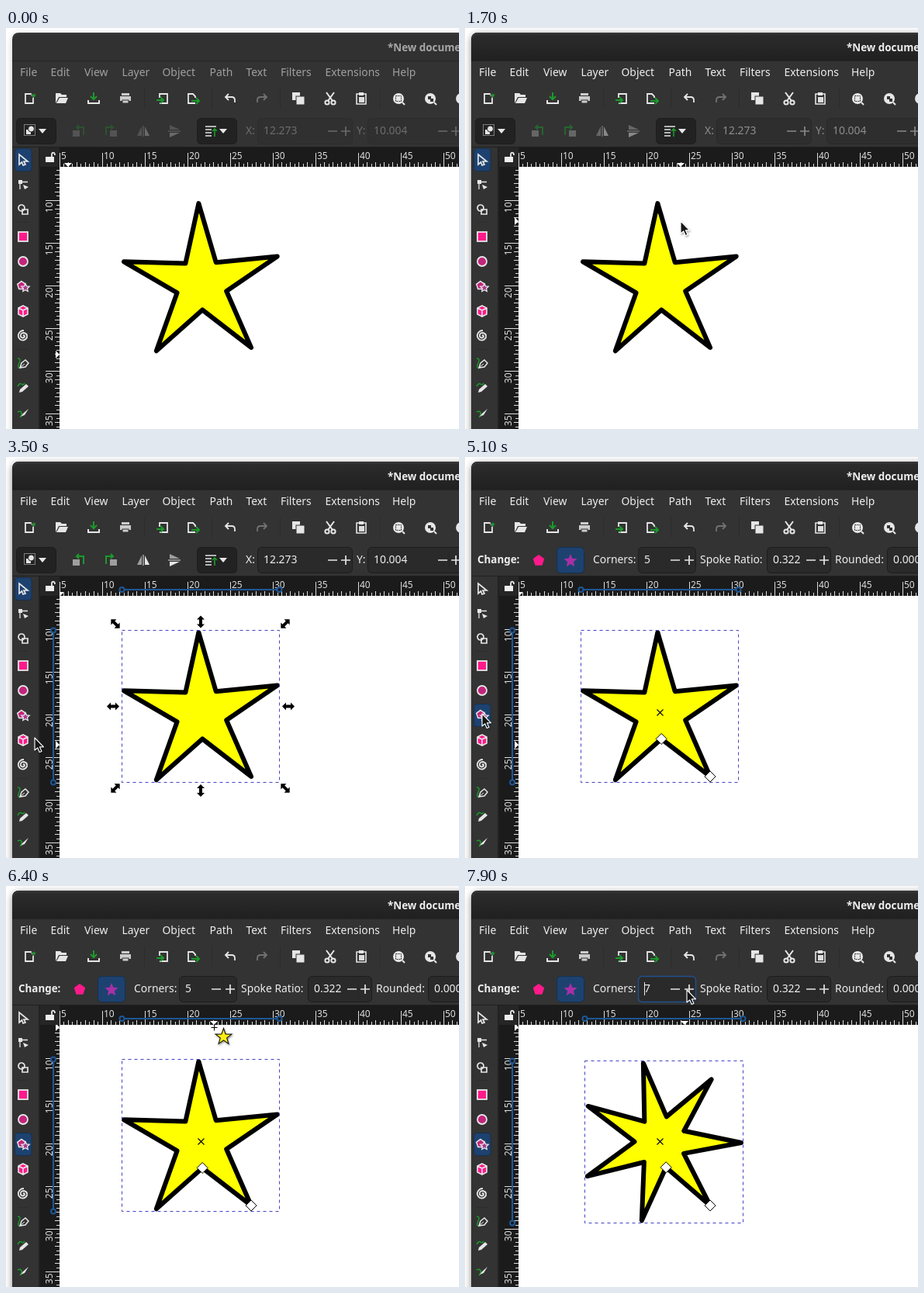
An HTML page for the animation above (8 s loop, 584x517 px).

```html
<!DOCTYPE html>
<html lang="en">
<head>
<meta charset="utf-8">
<title>Star tool</title>
<style>
html, body { margin: 0; width: 100%; height: 100%; overflow: hidden; background: #fff; }
svg { display: block; width: 584px; height: 517px; }
text { font: 13.9px "Noto Sans", "Open Sans", sans-serif; fill: #eee; white-space: pre; }
.bold { font-weight: 700; font-size: 13.4px; }
.rule text { font-size: 12px; fill: #ddd; }
.line { fill: none; stroke: #e6e6e6; stroke-width: 2; }
.green { fill: none; stroke: #1b9a2b; stroke-width: 2; }
.fill { fill: #e6e6e6; }
</style>
</head>
<body>
<svg id="stage" viewBox="0 0 584 517"></svg>
<script>
const stage = document.getElementById('stage');
const el = id => document.getElementById(id);
const text = (x, y, s, extra = '') => `<text x="${x}" y="${y}" ${extra}>${s}</text>`;
const rect = (x, y, w, h, fill, extra = '') =>
  `<rect x="${x}" y="${y}" width="${w}" height="${h}" fill="${fill}" ${extra}/>`;
const path = (d, cls = 'line', extra = '') => `<path d="${d}" class="${cls}" ${extra}/>`;
const thin = (d, width, cls = 'line') => path(d, cls, `style="stroke-width:${width}"`);
const at = (x, y, body, extra = '') => `<g transform="translate(${x} ${y})" ${extra}>${body}</g>`;
const mirror = body => `<g transform="scale(-1 1)">${body}</g>`;
const box = (x, w, fill = '#2a2a2a', extra = '') =>
  rect(x + .5, 116.5, w - 1, 33, fill, `rx="5" stroke="#1d1d1d" ${extra}`);

// Points of a star around a centre; the first tip lies at angle a.
function starPoints(n, cx, cy, r, ratio, a) {
  return Array.from({ length: 2 * n }, (_, i) => {
    const q = a + i * Math.PI / n, k = i % 2 ? r * ratio : r;
    return [cx + k * Math.cos(q), cy + k * Math.sin(q)];
  });
}
const poly = (pts, extra = '') =>
  `<polygon points="${pts.map(p => p.map(v => v.toFixed(2)).join()).join(' ')}" ${extra}/>`;
const UP = -Math.PI / 2;

// Rulers
const UNIT = 11.01;
const rulerX = u => Math.floor(124.5 + UNIT * (u - 10)) + .5;
const rulerY = u => Math.floor(222.5 + UNIT * (u - 10)) + .5;

function rulers() {
  let d = '', labels = '';
  for (let u = 5; u <= 52; u += .5) {
    const len = u % 5 === 0 ? 18 : u % 1 === 0 ? 6 : 4;
    const x = rulerX(u), y = rulerY(u);
    d += `M${x} 179v${-len}`;
    if (y > 179 && y < 517) d += `M69 ${y}h${-len}`;
    if (u % 5) continue;
    labels += text(x + 1.5, 169, u);
    if (u > 5) labels += text(0, 0, u, `text-anchor="end" transform="translate(60 ${y + 2}) rotate(-90)"`);
  }
  return `<g class="rule">${rect(44, 154, 540, 25, '#1b1b1b')}${rect(44, 179, 25, 338, '#1b1b1b')}` +
    path(d, '', 'stroke="#ddd" fill="none"') + labels + '</g>';
}

// Icons, each drawn around its own origin
const page = thin('M-6 -6H1L4 -3V6H-6Z', 1.8);
const lens = '<circle r="7" class="fill"/>' + path('M5 5L8 8');
const turn = rect(-1, 0, 9, 8, '#e6e6e6', 'opacity=".6"') + path('M-6 6V-4H3M0 -7L3 -4 0 -1', 'green');
const tip = path('M-5 -3H5L0 3Z', 'fill');
const undo = thin('M-6 -2H2Q6 -2 6 2V5M-2 -6L-6 -2 -2 2', 1.8);

const commands = [
  [31, page + poly(starPoints(5, 5, -4, 3.8, .45, UP), 'fill="#1b9a2b" stroke="#333" stroke-width=".6"')],
  [72, path('M-8 6V-7H-2L0 -5H6V-2H-4Z', 'fill') + path('M-3 -1H8L5 6H-7Z', 'fill')],
  [113, path('M-7 2V6H7V2') + path('M0 -8V1M-4 -3L0 1 4 -3', 'green')],
  [154, rect(-5, -7, 10, 3, '#ccc') + rect(-7, -3, 14, 6, '#ccc') + rect(-4, 2, 8, 4, '#ccc', 'stroke="#333"')],
  [202, thin('M-4 -1V-6H6V6H-4', 1.8) + path('M-8 2H0M-3 -2L1 2 -3 6', 'green')],
  [241, thin('M3 -1V-3L0 -6H-6V6H3', 1.8) + path('M-2 3H7M4 -1L8 3 4 7', 'green')],
  [289, undo],
  [330, `<g opacity=".35">${mirror(undo)}</g>`],
  [377, rect(-8, -8, 10, 10, '#e6e6e6') + rect(-3, -3, 11, 11, '#e6e6e6', 'stroke="#333"')],
  [418, path('M-5 -8L3 3M5 -8L-3 3') + '<circle cx="-4" cy="5" r="2.6" class="line"/><circle cx="4" cy="5" r="2.6" class="line"/>'],
  [458, thin('M-6 -6H6V7H-6Z', 1.6) + rect(-3, -8, 6, 4, '#e6e6e6') + rect(-3, -2, 7, 7, '#ddd')],
  [506, lens + rect(-3.5, -3.5, 7, 7, 'none', 'stroke="#333" stroke-dasharray="2 1"')],
  [547, lens + path('M-3 -3H1V1H-3ZM0 0H4V4H0Z', '', 'fill="#333"')],
  [587, lens]
];

const PINK = '#ff1a8c', ROSE = '#c4257c', BLUE = '#1d4270', NAVY = '#16304f';
const tools = [
  [170, thin('M-5 -7V6L-1.5 3 0 7 3 6 1 2H6Z', 1.7)],
  [202, rect(-6, -6, 5, 5, '#e6e6e6') + thin('M-4 -1V6M-1 -3.5H6', 1.3) + path('M0 0L7 3 2 6Z', 'fill')],
  [234, '<circle cx="-2" cy="-2" r="4" class="line" style="stroke-width:1.7"/>' + thin('M-1 0H6V6H-1Z', 1.7)],
  [269, rect(-6, -6, 12, 12, PINK, 'stroke="#e6e6e6" stroke-width="1.8"')],
  [301, `<circle r="6" fill="${ROSE}" stroke="#e6e6e6" stroke-width="1.8"/>`],
  [333, poly(starPoints(5, -2, -1, 5.5, .81, UP), `fill="${ROSE}" stroke="#e6e6e6" stroke-width="1.5"`) +
    poly(starPoints(5, 3, 2, 5.5, .48, UP), 'fill="#a5398f" stroke="#e6e6e6" stroke-width="1.3"')],
  [365, path('M0 -7L6 -4V4L0 7 -6 4V-4Z', '', `fill="${PINK}"`) + thin('M0 -7L6 -4V4L0 7 -6 4V-4ZM-6 -4L0 -1 6 -4M0 -1V7', 1.6)],
  [397, thin('M0 0Q2 -2 2 1Q0 4 -3 1Q-4 -4 1 -4Q6 -3 5 2Q2 7 -3 5Q-7 2 -6 -2Q-4 -7 1 -7', 1.8)],
  [432, thin('M-7 -6Q-2 -6 -5 0T-4 7', 1.5, 'green') + thin('M-4 6L-2 0 3 -4 7 0 3 5Z', 1.5) + thin('M-3 5L2 1', 1)],
  [464, thin('M-7 -2Q-4 -7 -2 -5T2 -6', 1.5, 'green') + path('M-5 6L-4 2 4 -5 7 -2 -1 5Z', 'fill')],
  [496, thin('M-7 -1Q-3 -3 -2 0T-4 6', 1.6, 'green') + path('M-3 5L0 1 7 -5 2 3Z', 'fill')]
];

const menus = [[18, 'File'], [57.5, 'Edit'], [101, 'View'], [149.5, 'Layer'], [201.5, 'Object'],
  [262.5, 'Path'], [309.5, 'Text'], [354, 'Filters'], [411.5, 'Extensions'], [498, 'Help']];

const minusPlus = (a, b) => thin(`M${a - 6} 133h12M${b - 6} 133h12M${b} 127v12`, 1.7) +
  path(`M${(a + b) / 2} 121v24`, 'line', 'style="stroke:#262626;stroke-width:1"');
const field = (x, w, value, a, b, id = 'v' + x) =>
  box(x, w, '#2a2a2a', `id="${id}Box"`) + text(x + 8, 137, value, `id="${id}"`) + minusPlus(a, b);

const selectBar = box(13, 52, '#222') +
  at(31, 132, rect(-7.5, -7.5, 14, 14, 'none', 'stroke="#ddd" stroke-dasharray="1 1"') +
    path('M-5 -1H1V5H-5Z', 'fill') + '<circle cx="1.5" cy="-2" r="4" class="fill" stroke="#222"/>') + at(47, 133, tip) +
  '<g id="fields">' + at(94, 132, mirror(turn)) + at(135, 132, turn) +
  at(177, 133, path('M-2 -6V6H-8Z', 'fill', 'opacity=".6"') + path('M2 -6V6H8Z', 'fill') + thin('M0 -7V7', 1)) +
  at(217, 133, path('M-6 -2H7L-6 -8Z', 'fill', 'opacity=".6"') + path('M-6 2H7L-6 8Z', 'fill') + thin('M-8 0H8', 1)) +
  text(309, 137, 'X:') + field(324, 123, '12.273', 421, 438) +
  text(452, 137, 'Y:') + field(466, 130, '10.004', 563, 580) + '</g>' +
  box(246, 52, '#222') + at(264, 133, thin('M-7 -6H7M-7 -2H1M-7 2H1M-7 6H1', 1.7) +
    thin('M5 7V-3M2 0L5 -3 8 0', 1.6, 'green')) + at(280, 133, tip);

const starBar = text(16, 137, 'Change:', 'class="bold"') +
  poly(starPoints(5, 95, 133.5, 7.6, .81, UP), `fill="${PINK}"`) +
  rect(118.5, 116.5, 35, 33, BLUE, `rx="5" stroke="${NAVY}"`) +
  poly(starPoints(5, 136, 134, 9, .45, UP), 'fill="#a92fa5"') +
  text(165, 137, 'Corners:') + field(223, 75, '5', 271, 289, 'count') +
  rect(231, 124, 1, 17, '#eee', 'id="caret"') +
  text(303, 137, 'Spoke Ratio:') + field(389, 83, '0.322', 446, 463) +
  text(477, 137, 'Rounded:') + field(544, 60, '0.000', 640, 660);

const arrow = path('M0 0V16L3.7 12.8 6.2 18.6 8.9 17.4 6.4 11.8H11.5Z', '',
  'fill="#151515" stroke="#fff" stroke-width="1.1" stroke-linejoin="round" filter="url(#soft)"');
const starCursor = path('M-3.5 .5H4.5M.5 -3.5V4.5', '', 'stroke="#000"') +
  poly(starPoints(5, 12.5, 12.5, 11, .4, UP), 'fill="#ffee12" stroke="#111" stroke-width="1.1" filter="url(#soft)"');

stage.innerHTML = `<defs>
  <filter id="blur" x="-10%" y="-10%" width="120%" height="120%"><feGaussianBlur stdDeviation="5"/></filter>
  <filter id="soft" x="-30%" y="-30%" width="180%" height="180%"><feDropShadow dx="1" dy="1.5" stdDeviation="1" flood-opacity=".4"/></filter>
  <linearGradient id="bar" x2="0" y2="1"><stop stop-color="#2d2d2d"/><stop offset="1" stop-color="#202020"/></linearGradient>
  <clipPath id="window"><path d="M8 517V15Q8 6 17 6H584V517Z"/></clipPath></defs>` +
  rect(0, 0, 584, 517, '#fff') + rect(8, 8, 620, 560, '#000', 'id="shadow" rx="9" filter="url(#blur)"') +
  '<g clip-path="url(#window)">' + rect(69, 179, 515, 338, '#fff') + '<g id="art"></g>' +
  rect(8, 42, 576, 112, '#333') + rect(8, 154, 34, 363, '#333') + rect(42, 154, 2, 363, '#222') + rulers() +
  '<g id="spans"></g>' +
  path('M-5 0H5L0 5Z', '', 'id="markX" fill="#fff"') + path('M0 -5V5L5 0Z', '', 'id="markY" fill="#fff"') +
  rect(44, 154, 25, 25, '#262626') + at(57, 167, rect(-6, -1, 11, 7, '#eee') + thin('M2 -1V-4Q2 -7 5 -6Q6 -5 6 -3', 1.8)) +
  rect(8, 6, 576, 36, '#313131') + rect(8, 6, 576, 36, 'url(#bar)', 'id="titleBar"') +
  path('M10 13Q11 7.5 17 7.5H584', '', 'fill="none" stroke="#3d3d3d"') + rect(8, 42, 576, 1, '#252525') +
  rect(8, 153, 576, 1, '#202020') +
  text(492, 30, '*New document', 'class="bold" id="title"') +
  '<g id="menu">' + menus.map(([x, s]) => text(x, 62, s)).join('') + '</g>' +
  [178, 265, 353, 482].map(x => rect(x, 78, 1, 26, '#2c2c2c')).join('') +
  commands.map(([x, body]) => at(x, 91, body)).join('') +
  `<g id="selectBar">${selectBar}</g><g id="starBar">${starBar}</g>` +
  rect(15, 250, 14, 1, '#2c2c2c') + rect(15, 414, 14, 1, '#2c2c2c') +
  rect(11.5, 0, 21.5, 29, BLUE, `id="active" rx="4" stroke="${NAVY}"`) +
  tools.map(([y, body]) => at(22, y, body)).join('') + '</g>' +
  `<g id="pointer"><g id="arrow">${arrow}</g><g id="starCursor">${starCursor}</g></g>`;

// Pointer path: time, x, y
const route = [
  [400, 217, 8], [500, 215, 17], [600, 214, 22], [1200, 214, 22], [1300, 217, 30], [1400, 226, 62],
  [1600, 262, 190], [1700, 278, 249], [1800, 285, 285], [1900, 281, 308], [2100, 268, 321],
  [2800, 268, 321], [3000, 215, 346], [3200, 110, 369], [3300, 72, 371], [3400, 48, 367],
  [3500, 37, 362], [4300, 22, 331], [5300, 22, 331], [5400, 50, 318], [5500, 85, 297],
  [5800, 175, 250], [6200, 245, 203], [6400, 268, 182], [6500, 279, 162], [6600, 284, 146],
  [6700, 286, 137], [6800, 286, 134]
];

function pointerAt(t) {
  const i = route.findIndex(k => k[0] > t);
  if (i < 0) return route[route.length - 1].slice(1);
  if (i === 0) return route[0].slice(1);
  const a = route[i - 1], b = route[i], p = (t - a[0]) / (b[0] - a[0]);
  return [1, 2].map(k => a[k] + (b[k] - a[k]) * p);
}

// Ruler marks keep the last place the pointer had on the canvas.
function markAt(t, [x, y]) {
  if (t < 1600) return [80, 421];
  if (t >= 6500) return [283, 182];
  if (t >= 3400 && t < 5500) return [70, 371];
  return [x, y];
}

const side = 'M-8 0L-3 -5V-2H3V-5L8 0 3 5V2H-3V5Z';
const handle = (x, y, angle) => `<path d="${side}" transform="translate(${x} ${y}) rotate(${angle})"/>`;
const diamond = ([x, y]) => path(`M${x} ${y - 7}l7 7-7 7-7-7Z`, '', 'fill="#fff" stroke="#000"');

function drawArt(n, selected, editing) {
  const pts = starPoints(n, 252, 330, 104, .322, 52 * Math.PI / 180);
  const xs = pts.map(p => p[0]), ys = pts.map(p => p[1]);
  const l = Math.floor(Math.min(...xs) - 3) + .5, r = Math.floor(Math.max(...xs) + 3) + .5;
  const top = Math.floor(Math.min(...ys) - 3) + .5, b = Math.floor(Math.max(...ys) + 3) + .5;
  const mx = (l + r) / 2, my = (top + b) / 2;
  let out = poly(pts, 'fill="#ff0" stroke="#000" stroke-width="6" stroke-linejoin="round"');
  if (selected) out += rect(l, top, r - l, b - top, 'none', 'stroke="#4343c4" stroke-dasharray="4 4"');
  if (editing) {
    out += path('M248 326l8 8m0-8l-8 8', '', 'stroke="#000" stroke-width="1.1" transform="translate(-.5 -.5)"') +
      diamond(pts[1]) + diamond(pts[0]);
  } else if (selected) {
    out += handle(l - 11.5, my, 0) + handle(r + 11.5, my, 0) + handle(mx, top - 11, 90) + handle(mx, b + 10.5, 90) +
      handle(l - 8.5, top - 8.5, 45) + handle(r + 7.5, b + 7.5, 45) +
      handle(r + 7.5, top - 8.5, -45) + handle(l - 8.5, b + 7.5, -45);
  }
  el('art').innerHTML = out;
  const ring = (x, y) => `<circle cx="${x}" cy="${y}" r="3" fill="#1b1b1b"/>`;
  el('spans').innerHTML = selected ? `<g stroke="#1d5796" stroke-width="2">` +
    path(`M${l} 171H${r}M61 ${top}V${b}`, '') + ring(l, 171) + ring(r, 171) + ring(61, top) + ring(61, b) + '</g>' : '';
}

const set = (id, name, value) => el(id).setAttribute(name, value);
const show = (id, on) => set(id, 'visibility', on ? 'inherit' : 'hidden');
let lastArt = '';

function render(t) {
  const focus = Math.min(1, Math.max(0, (t - 700) / 400));
  const selected = t >= 2800, editing = t >= 4600;
  const n = t >= 7700 ? 7 : t >= 7300 ? 6 : 5;

  set('shadow', 'opacity', .2 + .25 * focus);
  set('titleBar', 'opacity', focus);
  set('title', 'opacity', .62 + .38 * focus);
  set('menu', 'opacity', .58 + .42 * focus);
  set('fields', 'opacity', selected ? 1 : .3 + .18 * focus);
  show('selectBar', !editing);
  show('starBar', editing);
  set('active', 'y', editing ? 318.5 : 155.5);

  const artKey = [n, selected, editing].join();
  if (artKey !== lastArt) drawArt(n, selected, editing);
  lastArt = artKey;

  el('count').textContent = n;
  set('countBox', 'stroke', n > 5 ? '#204f8a' : '#1d1d1d');
  set('countBox', 'stroke-width', n > 5 ? 1.5 : 1);
  show('caret', editing && n > 5);

  const p = pointerAt(t), m = markAt(t, p);
  const onCanvas = t >= 5500 && t < 6500;
  show('pointer', t >= 400);
  show('arrow', !onCanvas);
  show('starCursor', onCanvas);
  set('pointer', 'transform', `translate(${p.map(Math.round).join(' ')})`);
  set('markX', 'transform', `translate(${m[0]} 174)`);
  set('markY', 'transform', `translate(64 ${m[1]})`);
}

// Pointer and clicks advance in steps of a tenth of a second.
function tick(now) {
  render(Math.floor(now % 8000 / 100) * 100);
  requestAnimationFrame(tick);
}
render(0);
requestAnimationFrame(tick);
</script>
</body>
</html>
```
